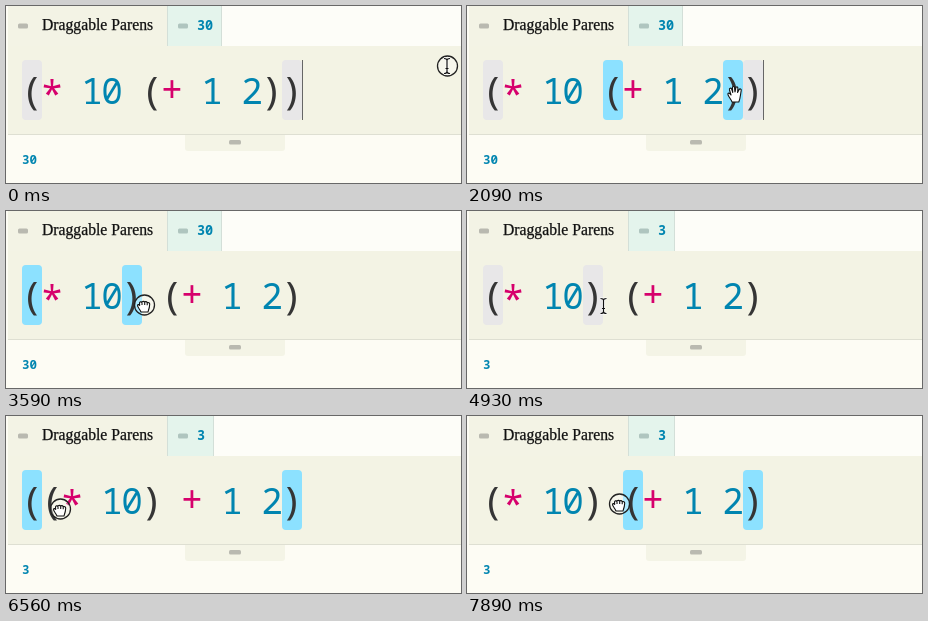
An HTML page for the animation above (8 s loop, 455 by 177 pixels).

```html
<!DOCTYPE html>
<html lang="en">
<head>
<meta charset="utf-8">
<title>Draggable Parens</title>
<style>
  html, body { margin: 0; width: 100%; height: 100%; overflow: hidden; background: #fdfcf4; }
  svg { display: block; width: 455px; height: 177px; }
  .title { font: 15.7px "Liberation Serif", serif; fill: #111; stroke: #111; stroke-width: .25; }
  .code text, .value { font-family: "Noto Sans Mono", monospace; }
  .code text { text-anchor: middle; }
  .paren { font-size: 39px; fill: #353535; }
  .digit { font-size: 36px; fill: #0085b0; }
  .star { font-size: 40px; fill: #d6006c; font-weight: 500; }
  .plus { font-size: 38px; fill: #d6006c; font-weight: 500; }
  .value { fill: #0085b0; font-weight: 600; }
  .grey rect { fill: #e8e7e8; }
  .blue rect { fill: #8ce1ff; }
  .pill { fill: #b9b9b0; }
  .edge { fill: #d3dfd8; }
  .hand { fill: #fff; stroke: #111; stroke-width: 1.1; stroke-linejoin: round; }
</style>
</head>
<body>
<svg viewBox="0 0 455 177">
  <defs>
    <path id="stem" d="M-3-7.5Q0-7.5 0-5.5V5.5Q0 7.5-3 7.5M3-7.5Q0-7.5 0-5.5M0 5.5Q0 7.5 3 7.5M-1.5 2.5h3"/>
  </defs>
  <rect width="455" height="177" fill="#fdfcf4"/>
  <rect x="2" width="453" height="40" fill="#fdfdf8"/>
  <rect x="2" width="160" height="40" fill="#f3f3e5"/>
  <rect id="tab" x="162" height="40" fill="#e4f4ec"/>
  <rect class="edge" x="161" width="1" height="40"/>
  <rect class="edge" id="tabEnd" width="1" height="40"/>
  <rect x="2" y="40" width="453" height="88" fill="#f3f3e4"/>
  <path d="M179 128h100v14q0 3-3 3h-94q-3 0-3-3z" fill="#f4f4e6"/>
  <rect x="2" y="128" width="453" height="1" fill="#dedfd2"/>
  <rect class="pill" x="12" y="17.5" width="10" height="5" rx="1.5"/>
  <rect x="172" y="17.5" width="10" height="5" rx="1.5" fill="#afc5bf"/>
  <rect class="pill" x="223" y="134" width="12" height="4.5" rx="1.5"/>
  <text class="title" x="36" y="24">Draggable Parens</text>
  <text class="value" x="191" y="24" font-size="13.5"></text>
  <text class="value" x="16" y="157.5" font-size="12.5"></text>
  <g class="grey"></g>
  <g class="blue"></g>
  <g id="lines"></g>
  <rect id="caret" y="54" width="1" height="60" fill="#666"/>
  <g id="pointer">
    <circle id="ring" cx=".5" r="10" fill="#fff" fill-opacity=".3" stroke="#222" stroke-width="1.3"/>
    <g id="beam" fill="none">
      <use href="#stem" stroke="#fff" stroke-width="2.6"/>
      <use href="#stem" stroke="#111" stroke-width="1.2"/>
    </g>
    <path id="open" class="hand" d="M-3 8C-4 5-8 1-7-.5C-6-1.5-5 0-4 1L-5.5-4C-6-6-4-6.5-3.3-4.8L-2.2-1.5L-2.6-6C-2.6-8-.6-8-.4-6L0-2L.8-6C1.2-7.8 3-7.4 2.9-5.5L2.6-1.5L4-4.2C4.8-5.8 6.6-5 6.2-3.3C5.5 0 5.5 4 3.8 8Z"/>
    <path id="closed" class="hand" d="M-3 7C-4 4-7 2-6.5 .2C-6-1-4.8-.2-4.3 .4L-4.5-1.5C-4.6-3.5-2.6-3.6-2.2-2.4C-1.8-4 .3-4 .6-2.6C1.2-3.9 3-3.5 3.2-2.2C4.2-3 5.8-2.2 5.7-.8C5.7 2 5 4 4 7ZM-2-2v2M.7-2v2M3.2-1.8v2"/>
  </g>
</svg>
<script>
const LOOP = 8000, STEP = 148.7, CELL = 20, LEFT = 16;
const $ = selector => document.querySelector(selector);
const LINES = ["(* 10 (+ 1 2))", "(* 10) (+ 1 2)", "((* 10) + 1 2)"];
const BASELINE = { paren: 98, digit: 97.5, star: 102.5, plus: 97 };

// Pointer path: step, x, y
const PATH = [
  [0, 441, 60], [6, 293, 86], [8, 289, 87], [9, 289, 87], [12, 268, 88],
  [14, 268, 88], [16, 286, 87], [19, 286, 87], [21, 216, 88], [24, 138, 94],
  [29, 138, 94], [30, 136.5, 95], [34, 136.5, 95], [37, 166, 89], [39, 166, 89],
  [42, 108, 91], [44, 54, 93], [45, 50, 93], [46, 50, 93], [53, 152, 88]
];

const kindOf = c => "()".includes(c) ? "paren" : c === "*" ? "star" : c === "+" ? "plus" : "digit";

const glyph = (c, i) => {
  if (c === " ") return "";
  const kind = kindOf(c);
  return `<text class="${kind}" x="${LEFT + CELL * (i + .5)}" y="${BASELINE[kind]}">${c}</text>`;
};

$("#lines").innerHTML = LINES.map(line => `<g class="code">${[...line].map(glyph).join("")}</g>`).join("");
const lineNodes = [...$("#lines").children];

const boxes = cells => cells.map(i =>
  `<rect x="${LEFT + CELL * i}" y="54" width="${CELL}" height="60" rx="4"/>`).join("");

const show = (node, visible) => { node.style.display = visible ? "" : "none"; };

function pointerAt(step) {
  const next = PATH.findIndex(p => p[0] >= step);
  if (next < 0) return PATH[PATH.length - 1].slice(1);
  if (next === 0) return PATH[0].slice(1);
  const a = PATH[next - 1], b = PATH[next];
  const k = (step - a[0]) / (b[0] - a[0]);
  return [a[1] + (b[1] - a[1]) * k, a[2] + (b[2] - a[2]) * k];
}

function hovered(step, x, line) {
  if (step < 5 || (step >= 30 && step < 37)) return [];
  if (step >= 37) return line === 2 ? [0, 13] : [7, 13];
  if (step < 18 && x < 276) return [6, 12];
  return line === 0 ? [0, 13] : [0, 5];
}

function draw(step) {
  const [x, y] = pointerAt(step);
  const line = step < 22 ? 0 : step >= 43 && x < 96 ? 2 : 1;
  const pressed = step === 0 || (step >= 18 && step < 29) || step >= 39;
  const typing = step < 5 || (step >= 30 && step < 37);
  const evaluated = step >= 29;
  const tabWidth = evaluated ? 46 : 54;

  lineNodes.forEach((node, i) => show(node, i === line));
  $(".grey").innerHTML = boxes(step < 22 ? [0, 13] : step < 39 ? [0, 5] : []);
  $(".blue").innerHTML = boxes(hovered(step, x, line));

  document.querySelectorAll(".value").forEach(node => { node.textContent = evaluated ? "3" : "30"; });
  $("#tab").setAttribute("width", tabWidth);
  $("#tabEnd").setAttribute("x", 162 + tabWidth - 1);

  $("#caret").setAttribute("x", step < 22 ? 296 : 116);
  show($("#caret"), step < 18 ? step % 7 < 4 : step >= 30 && step < 33);

  $("#pointer").setAttribute("transform", `translate(${x} ${y})`);
  show($("#ring"), pressed);
  show($("#beam"), typing);
  show($("#open"), !typing && !pressed);
  show($("#closed"), !typing && pressed);
}

let shown = -1;
function tick() {
  const step = Math.floor((performance.now() % LOOP + 6) / STEP);
  if (step !== shown) draw(shown = step);
  requestAnimationFrame(tick);
}
tick();
</script>
</body>
</html>
```
